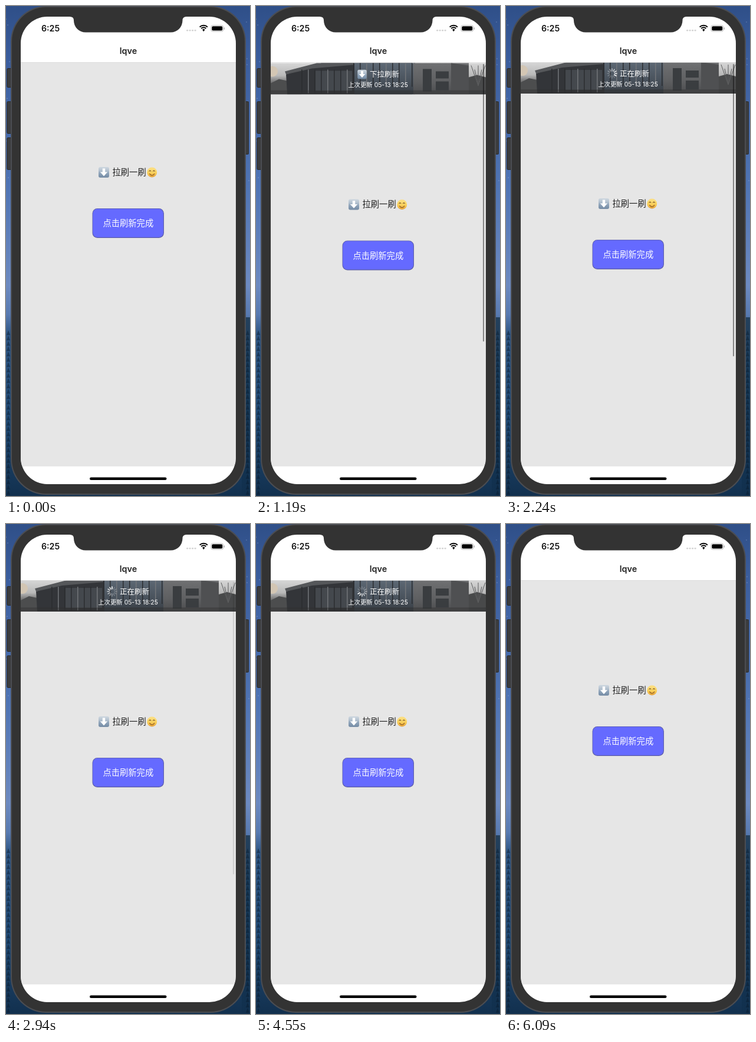
These frames come from a looping animation (414x828 px, 6160 ms). An HTML page with a canvas:

```html
<!DOCTYPE html>
<html lang="zh">
<head>
<meta charset="utf-8">
<title>Pull to refresh</title>
<style>
html, body { margin: 0; width: 100%; height: 100%; overflow: hidden; background: #2f4f88; }
canvas { display: block; width: 414px; height: 828px; }
</style>
</head>
<body>
<canvas id="stage" width="414" height="828"></canvas>
<script>
const ctx = document.getElementById('stage').getContext('2d');
const LOOP = 6160, STEP = 70;
const PULL = 560, HELD = 1450, RELEASE = 1540, CLOSE = 4589, CLOSED = 4996;
const REST = 53, PEAK = 68.6, TOP = 95;
const FONT = 'Inter, "Noto Sans CJK SC", "Noto Sans CJK", sans-serif';
const CJK = '"Noto Sans CJK SC", "Noto Sans CJK", sans-serif';

const clamp = v => Math.max(0, Math.min(1, v));
const smooth = v => { v = clamp(v); return v * v * (3 - 2 * v); };

function box(x, y, w, h, r, fill) {
  ctx.beginPath();
  ctx.roundRect(x, y, w, h, r);
  ctx.fillStyle = fill;
  ctx.fill();
}

function poly(fill, ...p) {
  ctx.beginPath();
  for (let i = 0; i < p.length; i += 2) ctx.lineTo(p[i], p[i + 1]);
  ctx.fillStyle = fill;
  ctx.fill();
}

function stroke(color, width, path) {
  ctx.beginPath();
  path();
  ctx.strokeStyle = color;
  ctx.lineWidth = width;
  ctx.stroke();
}

function disc(x, y, r, fill) {
  ctx.beginPath();
  ctx.arc(x, y, r, 0, 7);
  ctx.fillStyle = fill;
  ctx.fill();
}

function text(str, x, y, size, color, { align = 'left', weight = 400, font = FONT } = {}) {
  ctx.font = `${weight} ${size}px ${font}`;
  ctx.textAlign = align;
  ctx.textBaseline = 'alphabetic';
  ctx.fillStyle = color;
  ctx.fillText(str, x, y);
}

function gradient(y0, y1, ...stops) {
  const g = ctx.createLinearGradient(0, y0, 0, y1);
  for (let i = 0; i < stops.length; i += 2) g.addColorStop(stops[i], stops[i + 1]);
  return g;
}

function pullOffset(t) {
  if (t < RELEASE) return PEAK * smooth((t - PULL) / (HELD - PULL));
  if (t < CLOSE) {
    const x = (t - RELEASE) * 0.0137;
    return REST + (PEAK - REST) * (1 + x) * Math.exp(-x);
  }
  return REST * (1 - smooth((t - CLOSE) / (CLOSED - CLOSE)));
}

function wallpaper() {
  ctx.fillStyle = gradient(0, 828, 0, '#2f4f88', 0.12, '#3c5f9f', 0.36, '#4f74b4',
    0.57, '#6d8ac0', 0.63, '#587ab0', 0.67, '#2f5684', 0.85, '#214a74', 1, '#12304e');
  ctx.fillRect(0, 0, 414, 828);
  ctx.fillStyle = gradient(526, 828, 0, '#24405c', 0.3, '#183a58', 1, '#11304e');
  ctx.fillRect(400, 526, 14, 302);
  for (let i = 0; i < 14; i++) {
    const x = i % 2 ? 408 + i % 5 : i % 7;
    disc(x, (i * 67 + 22) % 330, 0.6, 'rgba(205,220,250,.7)');
  }
  // Tree tops along both edges.
  for (let y = 548; y < 828; y += 9)
    for (const x of [4, 410])
      poly('rgba(8,26,44,.45)', x, y, x + 3, y + 8, x - 3, y + 8);
}

function screenPath() {
  ctx.beginPath();
  ctx.roundRect(25, 18, 365, 790, 45);
}

function phoneBody() {
  for (const [x, y, h] of [[1.5, 105, 33], [1.5, 161, 55], [1.5, 222, 55], [404, 161, 90]]) {
    box(x, y, 8, h, 2, '#3c3d3f');
    stroke('#2a2b2d', 1, () => ctx.roundRect(x + 0.5, y + 0.5, 7, h - 1, 2));
  }
  box(8, 0, 399, 826, 60, '#4b4d52');
  box(10, 2, 395, 822, 58, '#333333');
  screenPath();
  ctx.fillStyle = '#ffffff';
  ctx.fill();
}

function notch() {
  ctx.beginPath();
  ctx.moveTo(108, 17);
  ctx.lineTo(108, 18);
  ctx.quadraticCurveTo(115, 18, 115, 24);
  ctx.arcTo(115, 44.5, 136, 44.5, 20);
  ctx.lineTo(279, 44.5);
  ctx.arcTo(299.5, 44.5, 299.5, 24, 20);
  ctx.quadraticCurveTo(299.5, 18, 306, 18);
  ctx.lineTo(306, 17);
  ctx.fillStyle = '#333333';
  ctx.fill();
}

function statusBar() {
  text('6:25', 60, 43, 14.2, '#111', { weight: 600 });
  for (let i = 0; i < 4; i++) box(306 + i * 4.5, 40, 3.2, 2.6, 1, '#d4d4d4');
  for (const r of [9.3, 5.7])
    stroke('#000', 2.1, () => ctx.arc(335.3, 42, r, -Math.PI * 0.75, -Math.PI * 0.25));
  ctx.beginPath();
  ctx.moveTo(335.3, 43.2);
  ctx.arc(335.3, 42, 3, -Math.PI * 0.75, -Math.PI * 0.25);
  ctx.fillStyle = '#000';
  ctx.fill();
  stroke('#bdbdbd', 1, () => ctx.roundRect(347.8, 32.8, 21, 10.2, 3));
  box(349.3, 34.2, 18, 7.4, 1.8, '#000');
  box(369.6, 36.3, 1.3, 3.4, 0.6, '#aaa');
}

function arrowIcon(cx, cy, size, up) {
  ctx.save();
  ctx.translate(cx, cy);
  ctx.scale(size / 18, size / 18);
  box(-9, -9, 18, 18, 3, gradient(-9, 9, 0, '#cfd8e0', 0.35, '#b3c1cf', 0.6, '#8ea3b9', 1, '#748ba4'));
  if (up) ctx.scale(1, -1);
  poly('#fff', -2.2, -6.5, 2.2, -6.5, 2.2, -0.5, 6.2, -0.5, 0, 6.4, -6.2, -0.5, -2.2, -0.5);
  ctx.restore();
}

function smiley(cx, cy) {
  ctx.save();
  ctx.translate(cx, cy);
  disc(0, 0, 8.5, gradient(-8.5, 8.5, 0, '#fbe08a', 0.45, '#fbd765', 0.75, '#f3bd48', 1, '#df9a3a'));
  ctx.lineCap = 'round';
  for (const x of [-3.3, 3.3])
    stroke('#7d5526', 1.1, () => ctx.arc(x, -1.2, 1.6, Math.PI * 1.1, Math.PI * 1.9));
  stroke('#855322', 1.2, () => ctx.arc(0, 0.6, 4.4, 0.45, Math.PI - 0.45));
  ctx.restore();
}

function spinner(cx, cy, t) {
  const head = Math.floor((t - RELEASE - 70) / 1000 * 12) + 9;
  ctx.save();
  ctx.translate(cx, cy);
  ctx.lineCap = 'round';
  for (let i = 0; i < 12; i++) {
    const age = ((head - i) % 12 + 12) % 12;
    ctx.save();
    ctx.rotate(i * Math.PI / 6);
    stroke(`rgba(255,255,255,${Math.max(0.22, 1 - age * 0.11)})`, 1.6, () => {
      ctx.moveTo(0, -4.4);
      ctx.lineTo(0, -8);
    });
    ctx.restore();
  }
  ctx.restore();
}

// Flat stand-in for the building photo; local size is 365 by 53.
function building() {
  ctx.fillStyle = gradient(0, 53, 0, '#d6d6d6', 0.4, '#b9b9b9', 0.7, '#555556', 1, '#3c3c3d');
  ctx.fillRect(0, 0, 365, 53);
  disc(3, 14, 9, '#d3c6b4');
  poly('#4c4d4e', 0, 34, 14, 27, 28, 30, 44, 24, 52, 53, 0, 53);
  poly('#333539', 26, 19, 86, 0, 240, 0, 240, 53, 28, 53);
  poly('#55575a', 24, 14, 78, 0, 140, 0, 140, 3, 70, 9, 26, 19);
  ctx.fillStyle = '#44484d';
  ctx.fillRect(76, 13, 62, 34);
  ctx.fillStyle = gradient(0, 53, 0, '#5d6874', 0.6, '#48515b', 1, '#373c42');
  ctx.fillRect(142, 0, 103, 53);
  for (let x = 52; x < 245; x += 11) {
    ctx.fillStyle = x % 3 ? '#2b2d30' : '#727579';
    ctx.fillRect(x, x < 140 ? 11 : 0, 1.5, 40);
  }
  ctx.fillStyle = gradient(0, 53, 0, '#6f7072', 0.6, '#5e5f61', 1, '#4b4c4e');
  ctx.fillRect(242, 0, 94, 53);
  ctx.fillStyle = '#3a3d40';
  ctx.fillRect(258, 10, 15, 38);
  ctx.fillRect(280, 14, 22, 12);
  ctx.fillRect(280, 31, 22, 15);
  poly('#4f5052', 306, 0, 336, 4, 336, 53, 306, 53);
  poly('#48494a', 336, 24, 350, 20, 365, 24, 365, 53, 336, 53);
  for (let i = 0; i < 5; i++)
    stroke('#5c5d5e', 1, () => { ctx.moveTo(352, 38); ctx.lineTo(340 + i * 6, 4 + i % 2 * 7); });
  ctx.fillStyle = 'rgba(45,45,47,.4)';
  ctx.fillRect(0, 46, 365, 7);
}

function banner(t, offset) {
  const refreshing = t >= RELEASE && t < CLOSE;
  const ready = t < RELEASE && offset > 60;
  ctx.save();
  ctx.translate(25, TOP + offset - REST);
  building();
  if (refreshing) spinner(155, 19, t);
  else arrowIcon(155, 19, 15.5, ready);
  const label = refreshing ? '正在刷新' : ready ? '松开刷新' : '下拉刷新';
  text(label, 168, 23.6, 12.5, '#fff', { font: CJK });
  text('上次更新 05-13 18:25', 182, 40.8, 10.4, '#fff', { align: 'center' });
  ctx.restore();
}

function content(offset) {
  ctx.save();
  ctx.translate(0, offset);
  ctx.fillStyle = '#e6e6e6';
  ctx.fillRect(25, TOP, 365, 683);
  arrowIcon(166, 281, 18);
  text('拉刷一刷', 180.5, 286, 14.3, '#222', { font: CJK });
  smiley(247.7, 281);
  box(146.5, 342, 121.5, 50, 8.5, '#5c5ea6');
  box(147.3, 342.8, 119.7, 48, 8, '#656aff');
  text('点击刷新完成', 207.3, 372.3, 14.3, '#fff', { align: 'center', font: CJK });
  ctx.restore();
}

function scrollbar(t, offset) {
  const alpha = clamp((t - PULL) / 140) * (1 - clamp((t - 2750) / 250));
  if (!alpha) return;
  const bottom = t < RELEASE ? 592 - offset * 0.46 : 592;
  box(385, 98, 2, bottom - 98, 1, `rgba(0,0,0,${0.42 * alpha})`);
}

function draw(t) {
  const offset = pullOffset(t);
  wallpaper();
  phoneBody();
  ctx.save();
  screenPath();
  ctx.clip();
  ctx.beginPath();
  ctx.rect(25, TOP, 365, 683);
  ctx.clip();
  if (offset > 0.05) banner(t, offset);
  content(offset);
  scrollbar(t, offset);
  ctx.restore();
  ctx.fillStyle = '#d9d9d9';
  ctx.fillRect(25, TOP, 365, 0.8);
  notch();
  statusBar();
  text('lqve', 207.5, 81, 14.4, '#222', { align: 'center', weight: 600 });
  box(142, 796.5, 130.5, 4.5, 2.25, '#000');
}

const start = performance.now();
function tick() {
  const t = (performance.now() - start) % LOOP;
  draw(Math.floor(t / STEP) * STEP);
  requestAnimationFrame(tick);
}
tick();
</script>
</body>
</html>
```
